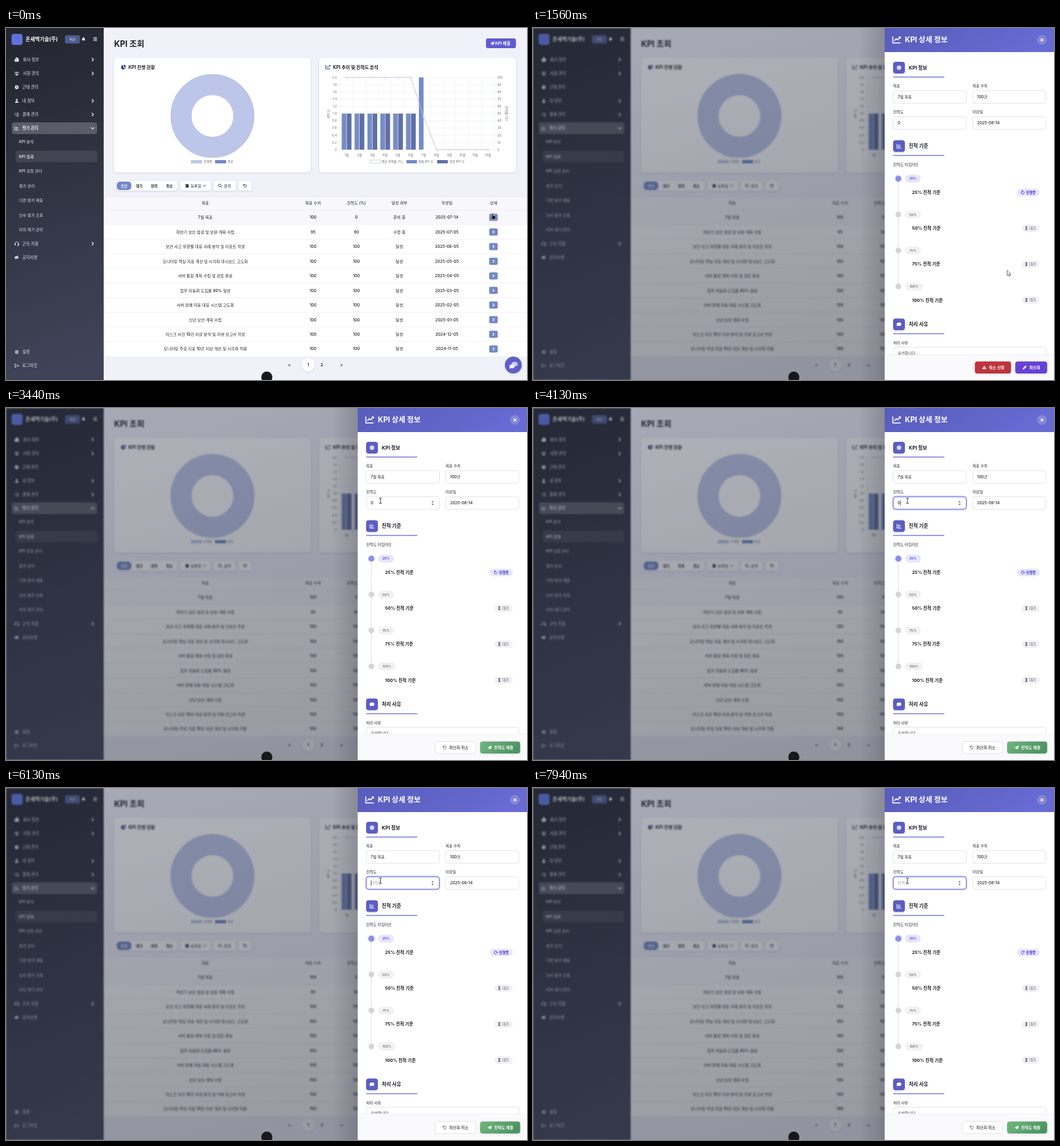
These frames come from a looping animation (800x541 px, 8000 ms). An HTML page:

```html
<!DOCTYPE html>
<html lang="ko">
<head>
<meta charset="utf-8">
<style>
html, body { margin: 0; width: 100%; height: 100%; overflow: hidden; background: #f1f1fa; }
svg { position: absolute; left: 0; top: 0; width: 100%; height: 100%; }
text { font-family: Inter, "Noto Sans CJK KR", "Noto Sans CJK", sans-serif; white-space: pre; }
</style>
</head>
<body>
<svg id="stage" viewBox="0 0 800 541"></svg>
<script>
const DURATION = 8000;
const BLUE = '#7389c5', PALE = '#bcc6e9', NAVY = '#5f70a6', INDIGO = '#5c5dc3', INK = '#1f2128';

// Drawing helpers; text is placed by its vertical centre.
const text = (x, y, s, size = 6.2, { w = 500, c = INK, a = 'start', extra = '' } = {}) =>
  `<text x="${x}" y="${y + size * .36}" font-size="${size}" font-weight="${w}" fill="${c}" text-anchor="${a}" ${extra}>${s}</text>`;
const mid = (x, y, s, size, o = {}) => text(x, y, s, size, { ...o, a: 'middle' });
const rect = (x, y, w, h, fill, r = 0, extra = '') =>
  `<rect x="${x}" y="${y}" width="${w}" height="${h}" rx="${r}" fill="${fill}" ${extra}/>`;
const circle = (x, y, r, fill, extra = '') => `<circle cx="${x}" cy="${y}" r="${r}" fill="${fill}" ${extra}/>`;
const line = (x1, y1, x2, y2, c, w = .6) => `<path d="M${x1} ${y1}L${x2} ${y2}" stroke="${c}" stroke-width="${w}"/>`;
const group = (id, body, extra = '') => `<g id="${id}" ${extra}>${body}</g>`;
const each = (list, fn) => list.map(fn).join('');
const range = n => [...Array(n).keys()];

// Icons on an 8-unit grid around the origin: [filled path, stroked path].
const ICONS = {
  building: ['M-4 4V-1h2v-3h4v2h2v6zM-1-2.5v1h1v-1zM-1 0v1h1v-1z', ''],
  users: ['M-1.5-2a1.5 1.5 0 1 0 3 0a1.5 1.5 0 1 0-3 0M-2.5 3.5q0-3 2.5-3t2.5 3zM-4-2.2a1 1 0 1 0 2 0a1 1 0 1 0-2 0M2-2.2a1 1 0 1 0 2 0a1 1 0 1 0-2 0M-4 1.5q0-2 2-2l-1 2zM4 1.5q0-2-2-2l1 2z', ''],
  clock: ['M-3.6 0a3.6 3.6 0 1 0 7.2 0a3.6 3.6 0 1 0-7.2 0M-.5-2.3h1V-.2L2 .8l-.5.8-2-1.3z', ''],
  user: ['M-1.8-2a1.8 1.8 0 1 0 3.6 0a1.8 1.8 0 1 0-3.6 0M-3.2 3.8q0-3.4 3.2-3.4t3.2 3.4z', ''],
  list: ['', 'M-4-2.5l.8.8 1.3-1.5M-4 .2l.8.8L-1.9-.5M-3.2 3h.5M-.5-2.4h4.3M-.5.3h4.3M-.5 3h4.3'],
  bars: ['', 'M-3.5-3.5v7h7.3M-1.5-1.8h3M-1.5 0h4.3M-1.5 1.8h2'],
  headset: ['M-4 0h2v3h-2zM2 0h2v3h-2z', 'M-3.4 1v-1a3.4 3.4 0 0 1 6.8 0v3q0 1-2.4 1'],
  horn: ['M-3.8-1.5h2.5L2.5-3.5v6.5L-1.3 1.5h-.2l.5 2h-1.5l-.5-2h-1zM3-1q1 .7 0 1.5z', ''],
  gear: ['M-2.7 0a2.7 2.7 0 1 0 5.4 0a2.7 2.7 0 1 0-5.4 0M-1.1 0a1.1 1.1 0 1 0 2.2 0a1.1 1.1 0 1 0-2.2 0M-.8-3.7h1.6v1.5h-1.6zM-.8 2.2h1.6v1.5h-1.6zM-3.6-1.8l.8-1.3 1.4.9-.8 1.2zM3.6 1.8l-.8 1.3-1.4-.9.8-1.2zM3.6-1.8l-.8-1.3-1.4.9.8 1.2zM-3.6 1.8l.8 1.3 1.4-.9-.8-1.2z', ''],
  exit: ['', 'M-1-3h-2.5v6h2.5M-1.5 0h5M2-1.8L3.8 0 2 1.8'],
  bell: ['M-3.5 2.3q1.3-1 1.3-3q0-2.5 2.2-2.8q2.2.3 2.2 2.8q0 2 1.3 3zM-1 3h2q-1 1.3-2 0z', ''],
  menu: ['', 'M-3-2.4h6M-3 0h6M-3 2.4h6'],
  next: ['', 'M-1.3-2.6L1.3 0-1.3 2.6'],
  down: ['', 'M-2.6-1.3L0 1.3 2.6-1.3'],
  plane: ['M-4 .5L4-4 2.8 3.2.4 2.2-1 4v-2.4L2.5-2.3-1.8 1.3z', ''],
  pie: ['M-.5-3.3v3.8l2.8 2.6a3.8 3.8 0 1 1-2.8-6.4M.5-4a3.7 3.7 0 0 1 3.5 3.7H.5zM1 .6h3q-.2 1.3-1 2z', ''],
  trend: ['', 'M-4-3.3v6.6h8M-2.4 1L-.4-1.2 1 .2 3.6-2.6M2-2.8h1.7v1.7'],
  calendar: ['M-3.2-3h6.4v6.5h-6.4zM-2.3-.9v1h1.3v-1zM-.5-.9v1h1.3v-1zM-2.3 1v1.3h1.3v-1.3zM-2-4h1v1.3h-1zM1-4h1v1.3h-1z', ''],
  search: ['', 'M1.4-.7a2.3 2.3 0 1 1-4.6 0a2.3 2.3 0 1 1 4.6 0M.8 1l2.6 2.6'],
  undo: ['', 'M-3-3.2v2.6h2.6M-2.8-.8a3 3 0 1 1 .3 2.5'],
  redo: ['', 'M3-3.2v2.6h-2.6M2.8-.8a3 3 0 1 0-.3 2.5'],
  target: ['M-1 0a1 1 0 1 0 2 0a1 1 0 1 0-2 0', 'M-3.4 0a3.4 3.4 0 1 0 6.8 0a3.4 3.4 0 1 0-6.8 0M-1.9 0a1.9 1.9 0 1 0 3.8 0a1.9 1.9 0 1 0-3.8 0'],
  bubble: ['M-4-.4q0-3 4-3t4 3t-4 3q-1 0-1.7-.2l-2 1.2.4-1.7q-.7-.8-.7-2.3', ''],
  glass: ['M-1.8-2.8h3.6q0 1.4-1.5 2.6q1.5 1 1.5 2.9h-3.6q0-1.9 1.5-2.9q-1.5-1.2-1.5-2.6', 'M-2.6-3.3h5.2M-2.6 3.3h5.2'],
  warn: ['M0-3.6L4 3.3h-8zM-.5-1.2l.2 2.2h.6l.2-2.2zM-.5 1.6v1h1v-1z', ''],
  pen: ['M-3.8 3.8l.6-2.6L1.6-3.6 3.6-1.6-1.2 3.2z', ''],
  cross: ['', 'M-2.2-2.2l4.4 4.4M2.2-2.2l-4.4 4.4'],
};
const icon = (name, x, y, c = INK, s = .9, w = 1.1) => {
  const [fill, stroke] = ICONS[name];
  return `<g transform="translate(${x} ${y}) scale(${s})"><path d="${fill}" fill="${c}" fill-rule="evenodd"/>` +
    `<path d="${stroke}" fill="none" stroke="${c}" stroke-width="${w}" stroke-linejoin="round"/></g>`;
};

function sidebar() {
  const c = '#e3e5ec';
  const menu = [['building', '회사 정보', 48.5, 'next'], ['users', '사원 관리', 70, 'next'], ['clock', '근태 관리', 91],
    ['user', '내 정보', 112, 'next'], ['list', '결재 관리', 133, 'next'], ['bars', '평가 관리', 154, 'down'],
    ['headset', '근속 지원', 331.5, 'next'], ['horn', '공지사항', 352.5], ['gear', '설정', 498], ['exit', '로그아웃', 519]];
  const sub = ['KPI 분석', 'KPI 조회', 'KPI 요청 관리', '평가 관리', '다면 평가 제출', '인사 평가 조회', '이의 제기 관리'];
  return rect(0, 0, 150, 541, 'url(#side)') + rect(8.5, 9, 17, 17, '#5d73dc', 4) +
    text(30, 17, '온새벽기술(주)', 7.9, { w: 700, c: '#fff' }) +
    rect(90.5, 11, 23, 13, '#4d5c8d', 3) + mid(102, 17.3, '퇴근', 5, { c: '#fff' }) +
    icon('bell', 119, 17, '#fff', .8) + icon('menu', 137, 17, '#fff', .9) +
    rect(9, 145, 131, 18, '#5a5d67', 4) + rect(15, 188.5, 125, 18, '#424551', 4) +
    each(menu, ([i, s, y, arrow]) => icon(i, 16.5, y, c, .8) +
      text(i === 'building' || i === 'users' ? 26 : 25, y, s, 6.3, { c, w: i === 'bars' ? 700 : 500 }) +
      (arrow ? icon(arrow, 133, y, c, 1, 1.2) : '')) +
    each(sub, (s, i) => text(20, 175 + i * 22.55, s, 6.1, { c, w: i === 1 ? 600 : 500 }));
}

function charts() {
  const top = 76, bottom = 187, left = 513, step = 19.75, gray = '#666870', small = { c: gray, w: 400 };
  const y = v => bottom - (bottom - top) * v;
  const x = i => left + step * (i + .5);
  const progress = i => i < 6 ? 1 : i === 6 ? .45 : 0;
  const ticks = each(range(11), i => line(left - 3, y(i / 10), 753, y(i / 10), '#e7e8ed', .5) +
    text(508, y(i / 10), i ? (i / 5).toFixed(1) : '0', 4.8, { ...small, a: 'end' }) + text(754.5, y(i / 10), i * 10, 4.8, small));
  const months = each(range(12), i => line(left + step * i, top, left + step * i, bottom + 3, '#e7e8ed', .5) +
    mid(x(i), 195, `${i + 1}월`, 4.8, small) +
    (i < 6 ? rect(x(i) - 7.4, y(.5), 7.2, y(0) - y(.5), '#778cc7') + rect(x(i) + .4, y(.5), 7.2, y(0) - y(.5), NAVY) : '') +
    (i === 6 ? rect(x(i) - 7.4, top, 7.2, bottom - top, '#778cc7') : ''));
  const points = range(12).map(i => [x(i), y(progress(i))]);
  const rotated = (px, py, s, a) => mid(px, py, s, 4.8, { ...small, extra: `transform="rotate(${a} ${px} ${py})"` });
  return each([166, 481], cx => rect(cx, 46, 302, 176, '#fff', 5, 'filter="url(#shadow)"')) +
    icon('pie', 180.5, 60, '#2e3c74') + text(188, 60.5, 'KPI 진행 현황', 7, { w: 700 }) +
    circle(317, 135.2, 48.2, 'none', `stroke="${PALE}" stroke-width="32.4"`) +
    rect(284, 203, 17, 5, PALE) + text(303.5, 205.3, '진행중', 4.8, small) + rect(321, 203, 17, 5, BLUE) + text(340, 205.3, '완료', 4.8, small) +
    icon('trend', 494.5, 60, '#2e3c74') + text(502, 60.5, 'KPI 추이 및 진척도 분석', 7, { w: 700 }) +
    ticks + months + line(750, top, 750, bottom, '#e7e8ed', .5) +
    `<polyline points="${points}" fill="none" stroke="#c3c5df" stroke-width=".9"/>` +
    each(points, ([px, py]) => circle(px, py, 1.2, '#fff', 'stroke="#c3c5df" stroke-width=".8"')) +
    rotated(495, 131.5, 'KPI 수', -90) + rotated(769, 131.5, '진척률 (%)', 90) +
    rect(559, 203, 16, 5, '#fff', 0, 'stroke="#c3c5df" stroke-width=".8"') + text(577, 205.3, '평균 진척률 (%)', 4.7, small) +
    rect(615, 203, 16, 5, BLUE) + text(633, 205.3, '전체 KPI 수', 4.7, small) +
    rect(662, 203, 16.5, 5, NAVY) + text(681, 205.3, '완료 KPI 수', 4.7, small);
}

function filters() {
  const pill = (x, w, r = 4) => rect(x, 235, w, 15, '#fff', r, 'filter="url(#shadow)"');
  return pill(169, 94, 5) + rect(170, 236, 22.5, 13, BLUE, 5) +
    each(['승인', '대기', '반려', '취소'], (s, i) => mid(181.3 + i * 23.2, 242.6, s, 5.4, { w: 600, c: i ? INK : '#fff' })) +
    pill(268, 46.5) + icon('calendar', 278, 242.5, INK, .75) + text(283.5, 242.6, '등록일', 5.8) + icon('down', 305, 242.5, INK, .9, .9) +
    pill(319, 33.5) + icon('search', 329, 242.5, INK, .85, .9) + text(334.5, 242.6, '검색', 5.7) +
    pill(357, 20) + icon('undo', 367, 242.5, INK, .75);
}

function table() {
  const columns = [306, 471.5, 538, 604, 677, 748.5];
  const rows = [['7월 목표', 100, 0, '준비 중', '2025-07-14'], ['하반기 보안 점검 및 보완 계획 수립', 95, 90, '수행 중', '2025-07-05'],
    ...['보안 사고 유형별 대응 사례 분석 및 리포트 작성', '모니터링 핵심 지표 개선 및 시각화 대시보드 고도화', '서버 통합 계획 수립 및 검토 완료',
      '업무 자동화 도입율 80% 달성', '서버 장애 자동 대응 시스템 고도화', '신년 보안 계획 수립',
      '리스크 사건 10건 이상 분석 및 리뷰 보고서 작성', '모니터링 주요 지표 10건 이상 개선 및 시각화 적용']
      .map((s, i) => [s, 100, 100, '달성', i < 6 ? `2025-0${6 - i}-05` : `2024-${18 - i}-05`])];
  return rect(150, 260, 650, 20, '#f8f8fc') + rect(150, 280, 650, 224.5, '#fff') + rect(150, 280, 650, 22.4, '#f8f8fc') +
    each(['목표', '목표 수치', '진척도 (%)', '달성 여부', '작성일', '상세'], (s, i) => mid(columns[i], 269.3, s, 6.1)) +
    line(150, 260, 800, 260, '#e6e7ee') +
    each(rows, (row, r) => {
      const y = 291 + r * 22.47;
      return line(150, y - 11.2, 800, y - 11.2, '#e9eaf0') + each(row, (s, i) => mid(columns[i], y, s, 6.2)) +
        rect(742, y - 5.5, 13, 11, BLUE, 2) + icon('next', 748.5, y, '#fff', .8, 1.3);
    }) +
    circle(464, 517.5, 10, '#fff', 'filter="url(#shadow)"') +
    each([[435, '&lt;'], [464, '1'], [485, '2'], [515, '&gt;']], ([x, s]) => mid(x, 518, s, 6.3, { w: 600 }));
}

const page = () => rect(-10, -10, 820, 560, '#f1f1fa') + sidebar() + text(166, 24, 'KPI 조회', 12.5, { w: 700 }) +
  rect(737, 16, 46, 15, '#5f5bd0', 3) + icon('plane', 746.5, 23.5, '#fff', .8) + text(751, 23.6, 'KPI 제출', 6.3, { w: 700, c: '#fff' }) +
  charts() + filters() + table() +
  circle(779, 518, 13, '#5e5fc4', 'filter="url(#shadow)"') + icon('bubble', 781, 517, '#c9cdf6', 1.2) + icon('bubble', 777, 520.5, '#eef0ff', 1);

function panel() {
  const section = (y, name, title) => rect(553, y - 9, 18, 18, INDIGO, 4, 'filter="url(#shadow)"') + icon(name, 562, y, '#fff', .9) +
    text(577, y, title, 7.6, { w: 700 }) + line(553, y + 14.3, 631.5, y + 14.3, '#6667dc', 1.3);
  const field = (x, y, label, value) => text(x, y - 17, label, 5.8) +
    rect(x, y - 9.8, 112.5, 19.6, '#fff', 4, 'stroke="#dcdee6" stroke-width=".8"') + text(x + 7, y, value, 6);
  const steps = each(range(4), i => {
    const y = 231.5 + i * 55.2, percent = (i + 1) * 25 + '%', on = i === 0;
    return (on ? circle(561, y, 5.5, '#dcdcfb', 'id="halo"') : '') + circle(561, y, 4.4, on ? '#8b8dea' : '#d4d5d9') +
      rect(572, y - 5.5, i === 3 ? 26 : 23, 11, on ? '#e6e6fd' : '#f1f2f4', 5.5, `stroke="${on ? '#d4d4fa' : '#e2e3e7'}" stroke-width=".5"`) +
      mid(i === 3 ? 585 : 583.5, y, percent, 5, { w: 600, c: on ? '#4c3fcb' : '#72747c' }) +
      text(582, y + 21, percent + ' 진척 기준', 6.8, { w: 700 }) +
      (on ? rect(743, 247, 35, 11.5, '#e6e6fd', 5.7) + group('spinner', icon('redo', 0, 0, '#4b3bd0', .75)) + text(757, 252.7, '진행중', 5.4, { w: 700, c: '#4328cf' })
        : rect(750, y + 15.3, 28, 11.5, '#f2f2f5', 5.7) + icon('glass', 757.5, y + 21, '#4d4f57', .75, .8) + text(762, y + 21.2, '대기', 5.4, { c: '#4d4f57' }));
  });
  const button = (x, w, fill, name, s, c = '#fff', extra = 'filter="url(#shadow)"') =>
    rect(x, 512.5, w, 18.5, fill, 4, extra) + icon(name, x + 14.5, 521.7, c, .8) + text(x + 21.5, 521.8, s, 6.1, { w: 600, c });
  const footer = y => rect(540, y, 260, 541 - y, '#fafafd') + line(540, y, 800, y, '#e6e7ee');
  return rect(500, 0, 40, 541, 'url(#edge)') + rect(540, 0, 260, 541, '#fff') + rect(540, 0, 260, 37, 'url(#head)') +
    icon('trend', 558.5, 18, '#fff', 1.5, 1) + text(571, 18.3, 'KPI 상세 정보', 11.3, { w: 700, c: '#fff' }) +
    circle(781.5, 18.3, 7.5, '#8487d6') + icon('cross', 781.5, 18.3, '#fff', .9, 1.3) +
    section(61, 'target', 'KPI 정보') + field(553, 106, '목표', '7월 목표') + field(675, 106, '목표 수치', '100건') +
    field(553, 146, '진척도', '') + field(675, 146, '마감일', '2025-08-14') +
    rect(553, 136.2, 112.5, 19.6, 'none', 4, 'id="focus" stroke="#7476e2" stroke-width="1" style="filter:drop-shadow(0 0 1.2px #8f91f0)"') +
    text(560, 146, '', 6, { extra: 'id="value"' }) + rect(0, 142, .6, 8, INK, 0, 'id="caret"') +
    group('arrows', '<path d="M653.4 145l1.6-2 1.6 2zM653.4 147.3l1.6 2 1.6-2z" fill="#44464e"/>') +
    section(181.5, 'bars', '진척 기준') + text(553, 210, '진척도 타임라인', 5.8) +
    line(561, 231, 561, 397, '#e0e1e7', 1.1) + steps +
    section(455.5, 'bubble', '처리 사유') + text(553, 483.5, '처리 사유', 5.8) +
    rect(553, 490.5, 235, 30, '#fff', 4, 'stroke="#dcdee6" stroke-width=".8"') + text(560, 499.8, '승인합니다.', 5.9) +
    group('viewing', footer(502.5) + button(678.5, 55.5, '#bd343b', 'warn', '취소 신청') + button(740.5, 49, '#663fd6', 'pen', '최신화')) +
    group('editing', footer(500.8) + button(659, 62.5, '#fff', 'undo', '최신화 취소', '#5c5f68', 'stroke="#dcdee6" stroke-width=".8"') +
      button(728, 61.5, 'url(#green)', 'plane', '진척도 제출'));
}

const gradient = (id, dir, ...stops) => `<linearGradient id="${id}" x2="${dir[0]}" y2="${dir[1]}">` +
  each(stops, ([c, o = 1], i) => `<stop offset="${i}" stop-color="${c}" stop-opacity="${o}"/>`) + '</linearGradient>';

const cursors = group('arrow', '<path d="M0 0v8l1.9-1.7 1.4 3 1.5-.7-1.4-2.8h2.5z" fill="#fff" stroke="#33353c" stroke-width=".7"/>') +
  group('hand', '<path d="M-.9-.2q.9-1 1.7 0v3.2l3.5.9q.9.3.7 1.4l-.6 3.7h-4.6l-2.7-3.5q.4-1.2 2 0z" fill="#15161b" stroke="#fff" stroke-width=".5"/>') +
  group('beam', '<path d="M-2-4.2q2 0 2 1.2v6q0 1.2-2 1.2M2-4.2q-2 0-2 1.2M0 3q0 1.2 2 1.2" fill="none" stroke="#22242b" stroke-width=".9"/>');

stage.innerHTML = '<defs>' +
  gradient('side', [.1, 1], ['#23252f'], ['#3f4357']) + gradient('head', [1, .2], ['#585cba'], ['#676bd3']) +
  gradient('green', [1, .3], ['#71b580'], ['#4e9463']) + gradient('dim', [.4, 1], ['#282e40', .36], ['#262b3a', .47]) +
  gradient('edge', [1, 0], ['#14161e', 0], ['#14161e', .18]) +
  '<filter id="shadow" x="-20%" y="-20%" width="140%" height="150%"><feDropShadow dx="0" dy="1" stdDeviation="1.8" flood-color="#30365c" flood-opacity=".14"/></filter></defs>' +
  group('base', page()) + rect(0, 0, 800, 541, 'url(#dim)', 0, 'id="overlay"') + group('drawer', panel()) +
  circle(400.5, 536.5, 8.5, '#17181c') + group('pointer', cursors);

const $ = id => document.getElementById(id);
const show = (id, on) => $(id).setAttribute('display', on ? 'inline' : 'none');
const clamp = v => Math.min(1, Math.max(0, v));
const ease = p => p * p * (3 - 2 * p);

// Pointer stops: [time, x, y].
const STOPS = [[0, 747, 285], [150, 748.5, 290], [1000, 748.5, 290], [1560, 728, 372.5], [2150, 764, 521], [2550, 764, 521], [3250, 575, 142.5], [DURATION, 575, 142.5]];
// Input contents: [time, value].
const EDITS = [[0, '0'], [3750, '0'], [4250, ''], [4500, '1'], [4700, '10'], [5800, '1'], [5970, '']];
const OPEN = 110, EDIT = 2400, FOCUS = 3750;

function pointerAt(t) {
  const i = STOPS.findIndex((s, k) => k && t <= s[0]);
  const [t0, x0, y0] = STOPS[i - 1], [t1, x1, y1] = STOPS[i];
  const p = ease((t - t0) / (t1 - t0));
  return [x0 + (x1 - x0) * p, y0 + (y1 - y0) * p];
}

function draw(t) {
  const open = 1 - (1 - clamp((t - OPEN) / 330)) ** 3;
  $('base').style.filter = open ? `blur(${1.25 * open}px)` : 'none';
  $('overlay').setAttribute('opacity', open);
  $('drawer').setAttribute('transform', `translate(${300 * (1 - open)} 0)`);

  show('viewing', t < EDIT);
  show('editing', t >= EDIT);
  $('spinner').setAttribute('transform', `translate(752 252.7) rotate(${(t + 60) * .18})`);
  $('halo').setAttribute('r', 5.5 + .4 * Math.cos(t * Math.PI / 1000));

  const [x, y] = pointerAt(t);
  const overInput = x < 665 && y < 156 && y > 136;
  const overButton = t < 300 || y > 512;
  $('pointer').setAttribute('transform', `translate(${x} ${y})`);
  show('beam', overInput);
  show('hand', overButton);
  show('arrow', !overInput && !overButton);

  const focused = t >= FOCUS;
  const [since, value] = EDITS.filter(e => e[0] <= t).pop();
  $('value').textContent = value || '진척도';
  $('value').setAttribute('fill', value ? INK : '#9a9ca5');
  $('caret').setAttribute('x', 560.2 + (value ? $('value').getComputedTextLength() : 0));
  show('focus', focused);
  show('arrows', focused || overInput);
  show('caret', focused && (t - since) % 1000 < 500);
}

function tick() {
  draw(performance.now() % DURATION);
  requestAnimationFrame(tick);
}
tick();
</script>
</body>
</html>
```
